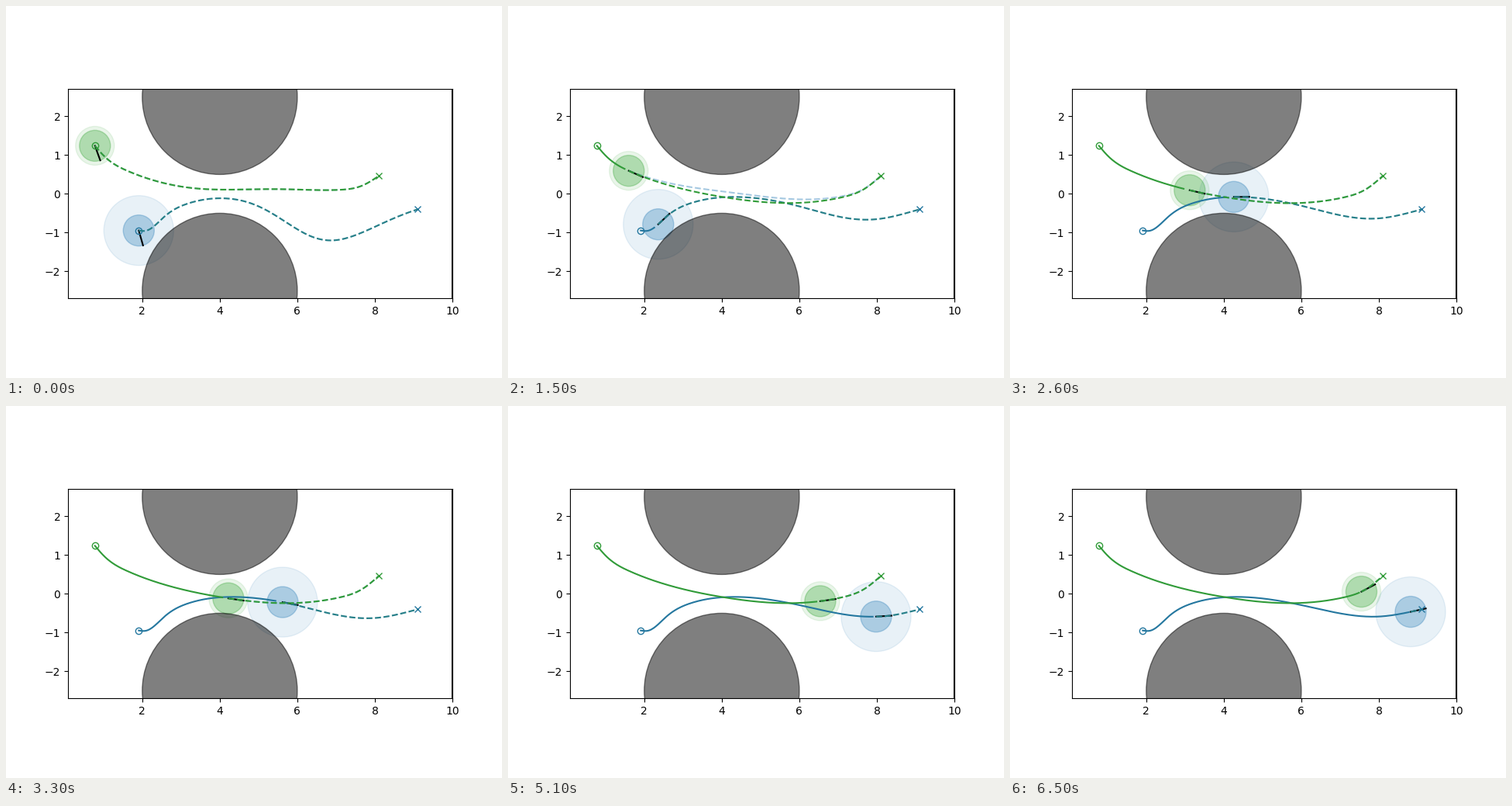
A matplotlib script for the animation above (6.6 s loop, 640 by 480 pixels).

```python
import numpy as np
import matplotlib.pyplot as plt
from matplotlib.animation import FuncAnimation

FRAMES, STEP = 66, 0.1
TIMES = [0, 1.5, 2.6, 3.3, 4.2, 5.1, 6.5]


def spline(points, start_slope=None):
    """Smooth cubic through key points, with natural ends or a set start slope."""
    xs, ys = np.array(points, float).T
    h = np.diff(xs)
    d = np.diff(ys) / h
    n = len(xs)
    a, b = np.zeros((n, n)), np.zeros(n)
    for i in range(1, n - 1):
        a[i, i - 1:i + 2] = h[i], 2 * (h[i - 1] + h[i]), h[i - 1]
        b[i] = 3 * (h[i] * d[i - 1] + h[i - 1] * d[i])
    a[0, :2], b[0] = (2, 1), 3 * d[0]
    a[-1, -2:], b[-1] = (1, 2), 3 * d[-1]
    if start_slope is not None:
        a[0, :2], b[0] = (1, 0), start_slope
    m = np.linalg.solve(a, b)

    def curve(x):
        i = np.clip(np.searchsorted(xs, x, side="right") - 1, 0, n - 2)
        u = (x - xs[i]) / h[i]
        v = 1 - u
        return (v * v * (1 + 2 * u) * ys[i] + u * v * v * h[i] * m[i]
                + u * u * (1 + 2 * v) * ys[i + 1] - u * u * v * h[i] * m[i + 1])

    return curve


class Agent:
    def __init__(self, ax, fill, line, radius, heading, stops, path):
        (self.start, y0), (self.goal, y1) = path[0], path[-1]
        self.progress = spline(list(zip(TIMES, stops)), 0)
        self.path = spline(path)
        self.heading = np.radians(heading)
        self.body = [ax.add_patch(plt.Circle((0, 0), r, color=fill, alpha=a))
                     for r, a in ((radius, 0.1), (0.4, 0.3))]
        self.nose, = ax.plot([], [], "k-", zorder=1.9)
        self.trail, = ax.plot([], [], color=line)
        self.plan, = ax.plot([], [], "--", color=line)
        ax.plot(self.start, y0, "o", color=line, fillstyle="none")
        ax.plot(self.goal, y1, "x", color=line)

    def x_at(self, t):
        return max(self.start, float(self.progress(t)))

    def route(self, t, height, center, width):
        """Way ahead: the final path plus a bump that vanishes at both ends."""
        x = np.linspace(self.x_at(t), self.goal, 200)
        bump = height * np.exp(-((x - center) / width) ** 2)
        ends = (1 - np.exp(-3 * (x - x[0]))) * (1 - np.exp(-3 * (x[-1] - x)))
        return x, self.path(x) + bump * ends

    def move(self, t):
        x = self.x_at(t)
        y = float(self.path(x))
        for circle in self.body:
            circle.center = x, y
        angle = np.arctan((self.path(x + 0.1) - y) / 0.1)
        angle += (self.heading - angle) * np.exp(-(t / 0.5) ** 2)
        self.nose.set_data([x, x + 0.4 * np.cos(angle)], [y, y + 0.4 * np.sin(angle)])
        past = np.linspace(self.start, self.x_at(max(t - STEP, 0)), 200)
        self.trail.set_data(past, self.path(past))


fig, ax = plt.subplots(figsize=(6.4, 4.8), dpi=100)
ax.set_aspect("equal")
ax.set_xlim(0.085, 10)
ax.set_ylim(-2.7, 2.7)
ax.axvline(10, color="k")

blue = Agent(ax, "tab:blue", "#24779f", 0.9, -74,
             [1.91, 2.36, 4.26, 5.62, 7.0, 7.98, 8.82],
             [(1.91, -.945), (2.1, -.95), (2.58, -.58), (3.2, -.24),
              (4.2, -.08), (6, -.29), (8, -.585), (9.1, -.4)])
green_guess, = ax.plot([], [], "--", color="tab:blue", alpha=0.4)

green = Agent(ax, "tab:green", "#309b38", 0.5, -70,
              [0.78, 1.6, 3.12, 4.22, 5.51, 6.54, 7.55],
              [(.78, 1.24), (1, .99), (1.6, .595), (2.5, .26), (4, -.08),
               (5.7, -.24), (7.1, -.09), (7.7, .14), (8.1, .46)])
blue_guess, = ax.plot([], [], "--", color="tab:green", alpha=0.2)

for y in (2.5, -2.5):
    ax.add_patch(plt.Circle((4, y), 2, color="k", alpha=0.5))


def draw(i):
    t = i * STEP
    blue.move(t)
    green.move(t)

    dip = -0.62 * np.exp(-3 * t) - 0.13 * np.exp(-t / 3)
    blue_route = blue.route(t, dip, 7.6 - np.exp(-t), 1.4)
    blue.plan.set_data(*blue_route)
    blue_guess.set_data(*blue_route)

    # The other agent's guess of the green route settles more slowly.
    for line, delay, power in ((green.plan, 0.7, 2), (green_guess, 1.57, 4)):
        rise = 0.36 * np.exp(-(t / delay) ** power)
        line.set_data(*green.route(t, rise, 5.6 - 0.7 * t, 2))


anim = FuncAnimation(fig, draw, frames=FRAMES, init_func=lambda: draw(0),
                     interval=1000 * STEP, repeat=True, repeat_delay=0)
plt.show()
```
